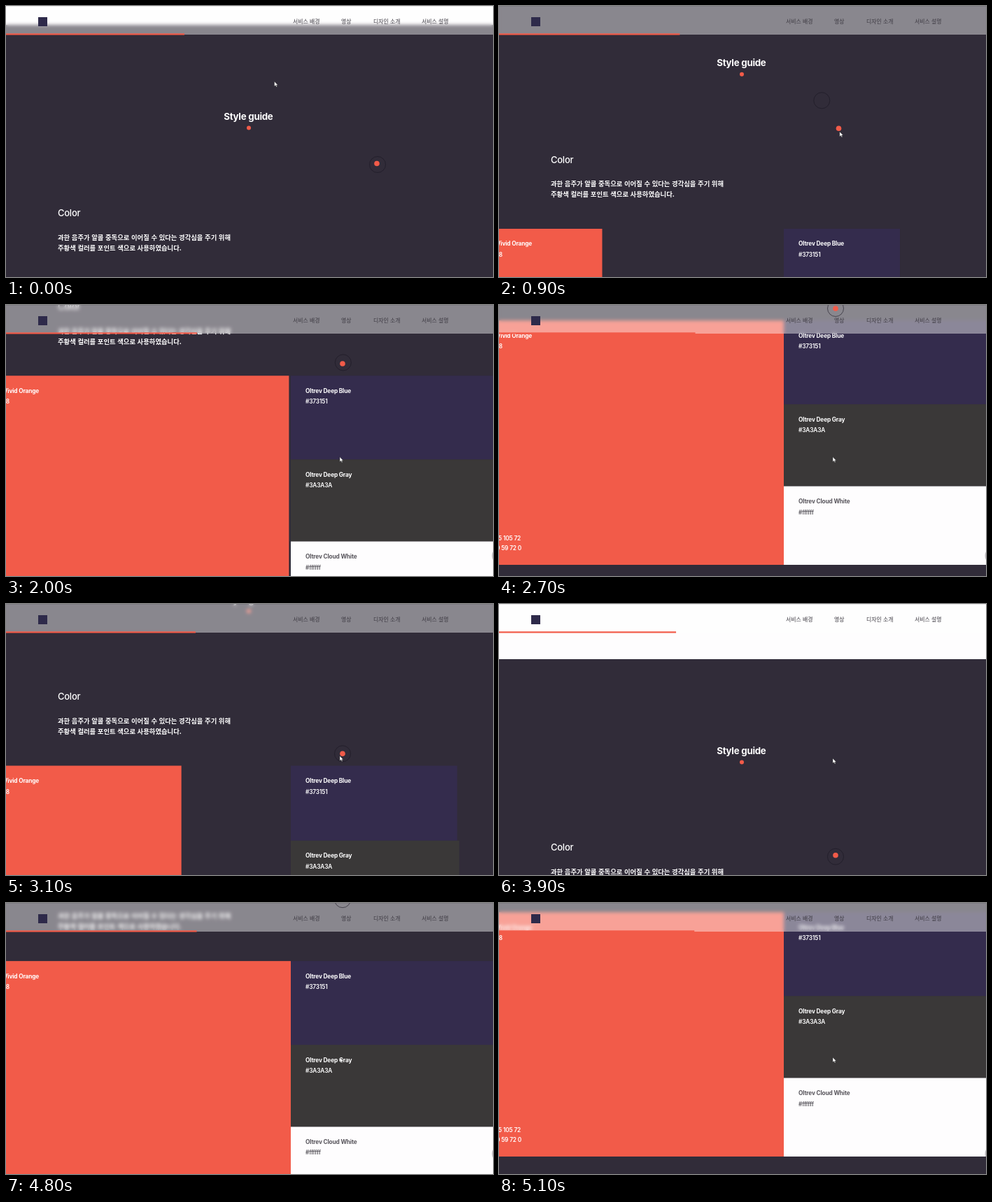
An HTML page that plays this animation: 696 by 388 pixels, repeating every 5200 ms.

```html
<!DOCTYPE html>
<html lang="ko">
<head>
<meta charset="utf-8">
<title>Style guide</title>
<style>
  html, body { margin: 0; width: 100%; height: 100%; overflow: hidden; background: #312c39; }
  #stage { position: relative; width: 696px; height: 388px; overflow: hidden; background: #312c39; }
  svg { position: absolute; left: 0; top: 0; display: block; }
  #glass {
    position: absolute; left: 0; top: 0; width: 696px; height: 41px;
    background: rgba(255, 255, 255, .43);
    -webkit-backdrop-filter: blur(2.5px); backdrop-filter: blur(2.5px);
  }
  text { fill: #fff; font-family: Inter, sans-serif; letter-spacing: -.02em; }
  .ko { font: 600 9.35px "Noto Sans CJK KR", "Noto Sans CJK", sans-serif; letter-spacing: 0; }
  .menu { font: 500 7.9px "Noto Sans CJK KR", "Noto Sans CJK", sans-serif; letter-spacing: 0; fill: #3d3a42; }
  .name { font-size: 8.3px; font-weight: 700; }
  .code { font-size: 8.3px; font-weight: 600; }
  .end { text-anchor: end; }
  .dim text { fill: #58555c; }
  .accent { fill: #f25b49; }
</style>
</head>
<body>
<div id="stage">
  <svg width="696" height="388">
    <g id="page">
      <rect y="-1270" width="696" height="1000" fill="#fefdfe"/>
      <text x="346.4" y="-134" text-anchor="middle" font-size="13.3" font-weight="700">Style guide</text>
      <circle class="accent" cx="347" cy="-122.5" r="3"/>
      <text x="74" y="4.3" font-size="13" font-weight="500">Color</text>
      <text class="ko" x="74" y="38">과한 음주가 알콜 중독으로 이어질 수 있다는 경각심을 주기 위해</text>
      <text class="ko" x="74" y="53">주황색 컬러를 포인트 색으로 사용하였습니다.</text>

      <g transform="translate(0 98.7)">
        <rect id="orange" class="accent"/>
        <text class="name end" x="47" y="24.5">Oltrev Vivid Orange</text>
        <text class="code end" x="5" y="40">#F56948</text>
        <g id="mix">
          <text class="code end" x="31" y="-35">RGB 245 105 72</text>
          <text class="code end" x="32" y="-20.6">CMYK 0 59 72 0</text>
        </g>
        <g class="swatch">
          <rect fill="#342c4d"/>
          <text class="name" x="21" y="24.5">Oltrev Deep Blue</text>
          <text class="code" x="21" y="40">#373151</text>
        </g>
        <g class="swatch">
          <rect fill="#3a3838"/>
          <text class="name" x="21" y="24.5">Oltrev Deep Gray</text>
          <text class="code" x="21" y="40">#3A3A3A</text>
        </g>
        <g class="swatch dim">
          <rect fill="#fefdfe"/>
          <text class="name" x="21" y="24.5">Oltrev Cloud White</text>
          <text class="code" x="21" y="40">#ffffff</text>
        </g>
      </g>
    </g>
    <circle cx="707" cy="359" r="12.5" fill="#312c39" opacity=".3"/>
  </svg>

  <div id="glass"></div>

  <svg width="696" height="388">
    <rect width="696" height="1" opacity=".08"/>
    <rect x="46" y="16" width="13" height="13" fill="#2e2a4a"/>
    <text class="menu" x="410" y="24.5">서비스 배경</text>
    <text class="menu" x="479" y="24.5">영상</text>
    <text class="menu" x="525" y="24.5">디자인 소개</text>
    <text class="menu" x="594" y="24.5">서비스 설명</text>
    <rect id="bar" class="accent" y="39.3" height="2.2"/>
    <circle id="ring" r="11.5" fill="none" stroke="#1c1924" stroke-opacity=".75" stroke-width=".8"/>
    <circle id="dot" class="accent" r="3.8"/>
    <path id="arrow" d="M0 0V7L1.7 5.5 2.9 8 4 7.5 2.9 5.2H5Z" fill="#fff" stroke="#222" stroke-width=".4"/>
  </svg>
</div>

<script>
const LOOP = 5200, TICK = 100;
const $ = id => document.getElementById(id);

const easeOut = u => 1 - (1 - u) ** 1.67;

// Runs eased moves one after another; before, between and after them the value rests.
function glide(value, moves, t) {
  for (const { from, until, to } of moves) {
    const u = easeOut(Math.min(1, Math.max(0, (t - from) / (until - from))));
    value += (to - value) * u;
  }
  return value;
}

const swipes = [
  { from: 600, until: 1500, to: 141 },
  { from: 1500, until: 2600, to: -76.5 },
  { from: 2700, until: 3900, to: 349 },
  { from: 3900, until: 4400, to: 137 },
  { from: 4500, until: 5100, to: -85.5 },
];
const scrollAt = t => glide(297, swipes, t);

const moves = [
  { from: 500, until: 1200, x: 520, y: 203 },
  { from: 1200, until: 1500, x: 477, y: 217.5 },
  { from: 3200, until: 3300, x: 477, y: 221 },
];
const along = axis => moves.map(m => ({ from: m.from, until: m.until, to: m[axis] }));
const xMoves = along('x'), yMoves = along('y');
const arrowAt = t => ({ x: glide(383.5, xMoves, t), y: glide(108, yMoves, t) });

const barFor = scroll => 255 + (297 - scroll) * .07;

// Dot and ring chase the last pointer position on the page, the bar chases the scroll.
function stateAt(time) {
  const dot = { x: 530, y: -71.5 }, ring = { x: 531, y: -70 };
  let arrow = arrowAt(0), scroll = scrollAt(0), bar = barFor(scroll);
  let goal = { x: arrow.x + 4, y: arrow.y + 5 - scroll };
  const chase = (p, rate) => {
    p.x += (goal.x - p.x) * rate;
    p.y += (goal.y - p.y) * rate;
  };
  for (let t = TICK; t <= time; t += TICK) {
    const next = arrowAt(t);
    scroll = scrollAt(t);
    if (next.x !== arrow.x || next.y !== arrow.y) {
      goal = { x: next.x + 4, y: next.y + 5 - scroll };
    }
    arrow = next;
    chase(dot, .8);
    chase(ring, .4);
    bar += (barFor(scroll) - bar) * .4;
  }
  return { arrow, scroll, bar, dot, ring };
}

const place = (el, x, y) => el.setAttribute('transform', `translate(${x} ${y})`);
const size = (el, w, h) => {
  el.setAttribute('width', Math.max(0, w));
  el.setAttribute('height', h);
};

const swatches = [...document.querySelectorAll('.swatch')];
const fullHeights = [120, 117.3, 112.5];

// The panels grow as they are scrolled into view.
function layoutPanels(scroll) {
  const shown = 141 - scroll;
  const scale = Math.max(0, Math.min(1, .872 + .0027 * shown));
  let y = 0;
  swatches.forEach((g, i) => {
    const h = fullHeights[i] * scale;
    place(g, 407, y);
    size(g.firstElementChild, Math.min(289, 231 + 3 * i + .82 * shown), h);
    y += h;
  });
  size($('orange'), Math.min(407, 241 + 1.18 * shown), y);
  place($('mix'), 0, y);
}

function draw(t) {
  const { arrow, scroll, bar, dot, ring } = stateAt(t);
  place($('page'), 0, scroll);
  layoutPanels(scroll);
  $('bar').setAttribute('width', bar);
  place($('arrow'), arrow.x, arrow.y);
  place($('dot'), dot.x, scroll + dot.y);
  place($('ring'), ring.x, scroll + ring.y);
}

const start = performance.now();
function frame() {
  const t = (performance.now() - start) % LOOP;
  draw(Math.floor(t / TICK) * TICK);
  requestAnimationFrame(frame);
}
frame();
</script>
</body>
</html>
```
